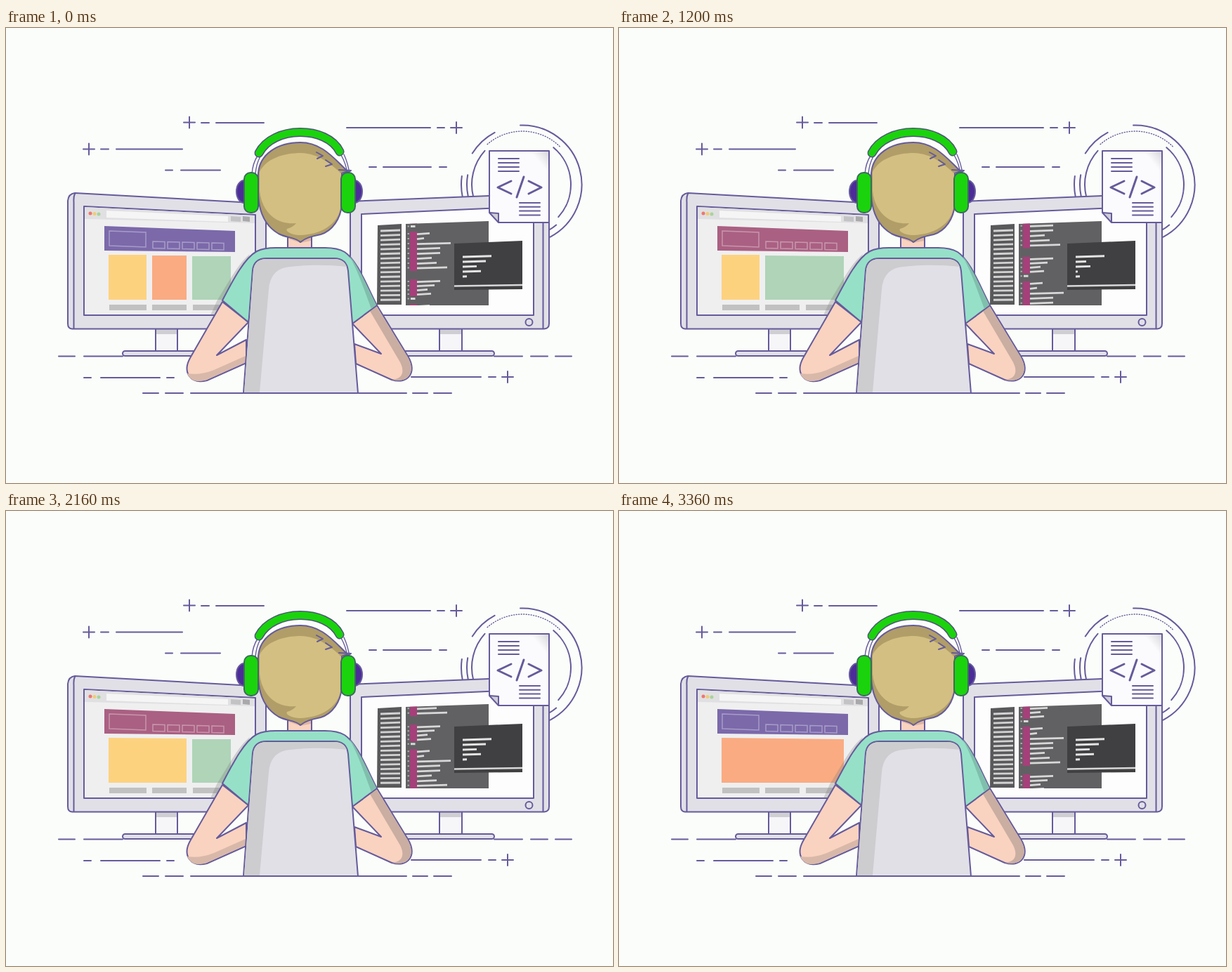
Recreate the animation shown at these times as an HTML page. Size 864 by 648 pixels, loop 3.52 s.

```html
<!DOCTYPE html>
<html lang="en">
<head>
<meta charset="utf-8">
<title>Developer at work</title>
<style>
  html, body { margin: 0; width: 100%; height: 100%; overflow: hidden; background: #fbfdfa; }
  svg { display: block; width: 100vw; height: 100vh; filter: blur(.65px); }
  .ink { stroke: #655b9b; stroke-width: 2; stroke-linejoin: round; stroke-linecap: round; }
  .body { fill: #e1e0e7; }
  .skin { fill: #fad2c0; }
  .none { fill: none; }
</style>
</head>
<body>
<svg viewBox="0 0 864 648">
  <defs>
    <clipPath id="panelClip"><path d="M569 279L687 275V395H569Z"/></clipPath>
    <linearGradient id="sheet" x1="0" y1="1" x2="1" y2="0">
      <stop offset=".84" stop-color="#fbfbfd"/><stop offset="1" stop-color="#d5d5da"/>
    </linearGradient>
  </defs>

  <path id="dashes" class="ink none"/>
  <path id="rings" class="ink none"/>
  <path id="dotted" class="ink none" stroke-dasharray="1 2.500" style="stroke-width: 1.4"/>

  <!-- left monitor -->
  <g class="ink body">
    <path d="M213 428H244V461H213Z" fill="#f6f6f9"/>
    <path d="M214 429H243V436H214Z" fill="#cfcfd3" stroke="none"/>
    <rect x="166" y="460" width="110" height="7" rx="3.500"/>
    <path d="M98 235L370 250V320L322 428.500H94Q88 428 88 421V246Q89 236 98 235Z"/>
    <path d="M98 236Q96 240 96.500 248V428" class="none"/>
    <path d="M111 254L355 266V330L318 409H111Z" fill="#efeff0"/>
  </g>
  <path d="M112 255L354 267V278L112 272Z" fill="#e0e0e2"/>
  <path d="M143 260L316 268V276L143 270Z" fill="#f5f5f5"/>
  <path d="M320 268L334 269V276L320 275Z" fill="#c3c3c6"/>
  <path d="M337 268L347 269V276L337 275Z" fill="#a9a9ab"/>
  <circle cx="120" cy="264" r="2.500" fill="#ee7670"/>
  <circle cx="126" cy="264.500" r="2.500" fill="#f1cc74"/>
  <circle cx="132" cy="265" r="2.500" fill="#a7d49c"/>
  <path id="header" d="M140 282L326 289V319L140 317Z"/>
  <path id="menu" fill="none" stroke="#fff" stroke-opacity=".34" stroke-width="1.500"/>
  <g id="cards"></g>
  <path d="M147 394H200V402H147ZM208 394H257V402H208ZM266 394H312V402H266Z" fill="#c1c1c2"/>
  <path d="M347 322C330 336 317 362 300 389L291 409H322Z" fill="#777" opacity=".28"/>

  <!-- right monitor -->
  <g class="ink body">
    <path d="M617 428H649V461H617Z" fill="#f6f6f9"/>
    <path d="M618 429H648V436H618Z" fill="#cfcfd3" stroke="none"/>
    <rect x="560" y="460" width="135" height="7" rx="3.500"/>
    <path d="M490 247L763 236Q773 237 773 248V421Q773 428 766 428.500H512L490 340Z"/>
    <path d="M763 237Q765 241 764.500 249V428" class="none"/>
    <path d="M506 265L751 254V409H520L506 360Z" fill="#fcfdfc"/>
    <circle cx="744.500" cy="419" r="5"/>
  </g>
  <path d="M529 281L563 279V394L528 394Z" fill="#59595b"/>
  <path id="files" stroke="#d2d2d2" stroke-width="2.800"/>
  <path d="M569 279L687 275V395H569Z" fill="#616163"/>
  <g clip-path="url(#panelClip)">
    <g id="code">
      <path id="marks" stroke="#a5407a" stroke-width="10"/>
      <path id="rows" stroke="#d8d8d8" stroke-width="2.800"/>
      <path id="dots" stroke="#a9a9ab" stroke-width="2"/>
    </g>
  </g>
  <path d="M638 307L735 303V372L638 373Z" fill="#404042"/>
  <path d="M638 367.500L735 366" stroke="#d8d8d8" stroke-width="2.500"/>
  <path id="shell" stroke="#e4e4e4" stroke-width="2.900"/>

  <!-- code sheet -->
  <g class="ink none">
    <path d="M688 175H773V277H702L688 262Z" fill="url(#sheet)"/>
    <path d="M688 263L701 264V277Z" fill="#cfced8"/>
    <path id="notes"/>
    <path d="M719 218L700 227L719 236M737 212L727 241M744 218L762 227L744 236" style="stroke-width: 3"/>
  </g>

  <!-- arms and shirt -->
  <g class="ink skin">
    <path d="M308 390L262 470C251 490 262 508 286 502L342 477V444L300 466L345 419Z"/>
    <path d="M528 395L573 469C585 490 573 508 549 501L498 478L496 450L534 464L493 421Z"/>
  </g>
  <path d="M258 492C263 504 274 505 286 501L341 476V467L296 487Q276 495 258 492Z" fill="#d8b8a9"/>
  <path d="M527 396L572 469C584 490 572 506 550 501C566 499 567 488 561 476L518 403Z" fill="#c9aea1"/>
  <path class="ink skin" d="M401 292H435V316H401Z"/>
  <path d="M402 296H434V303L419 306L402 300Z" fill="#dcb5a4"/>
  <path class="ink" fill="#96e0c8" d="M308 388C324 357 340 327 357 318Q367 313 384 313H454Q472 313 482 319C500 331 513 366 528 395L493 421L480 350H358L345 419Z"/>
  <path d="M489 325C501 337 515 370 527 394L520 400C510 374 502 348 489 325Z" fill="#80bfac"/>

  <!-- chair -->
  <path class="ink body" d="M338 520L351 345Q353 328 371 328H467Q485 328 487 346L501 520Z"/>
  <path d="M339 519L352 345Q354 329 371 329H467Q481 329 485 340C450 336 416 338 398 341Q376 346 374 372L361 519Z" fill="#cdcdcf"/>

  <!-- head -->
  <path class="ink" fill="#b09d68" d="M419 305C412 298 399 299 388 293C369 282 359 263 359 232V207C361 180 386 163 419 163C444 163 460 178 476 194L486 204L478 207V250C477 272 464 289 448 294C434 297 426 299 419 305Z"/>
  <path fill="#d3bf81" d="M361 205C370 186 395 178 420 178C445 179 462 193 477 207V250C475 282 445 294 420 295C408 295 397 290 400 286Q408 284 413 278C385 281 364 262 361 232Z"/>
  <path class="ink none" d="M442 177L451 182L443 186M455 188L464 194L455 197M474 202L491 203L480 209"/>

  <!-- headphones -->
  <g class="ink none">
    <path d="M358 182Q351 193 350 208M362 183Q356 194 355 208M477 181Q484 193 486 208M481 180Q487 193 489 208" style="stroke-width: 1.4"/>
    <ellipse cx="339" cy="233" rx="11" ry="16" fill="#4c2d98"/>
    <ellipse cx="496" cy="233" rx="11" ry="16" fill="#4c2d98"/>
    <path d="M360 178C380 139 457 139 475 176" style="stroke: #50547b; stroke-width: 13"/>
    <path d="M360 178C380 139 457 139 475 176" style="stroke: #1ad30c; stroke-width: 10"/>
    <rect x="339" y="206" width="20" height="57" rx="9" fill="#1ad30c" style="stroke: #3f6960"/>
    <rect x="477" y="206" width="20" height="57" rx="9" fill="#1ad30c" style="stroke: #3f6960"/>
  </g>
</svg>
<script>
const $ = id => document.getElementById(id);
const put = (id, d) => $(id).setAttribute('d', d);
const dash = (y, ...xs) => {
  let d = '';
  for (let i = 0; i < xs.length; i += 2) d += `M${xs[i]} ${y}H${xs[i + 1]}`;
  return d;
};
const plus = (x, y) => `M${x - 8} ${y}h16M${x} ${y - 8}v16`;
const arc = (r, from, to) => {
  const at = a => `${735 + r * Math.cos(a * Math.PI / 180)} ${223 + r * Math.sin(a * Math.PI / 180)}`;
  return `M${at(from)}A${r} ${r} 0 0 1 ${at(to)}`;
};

put('dashes', plus(118, 172.5) + dash(172.5, 135, 146, 157, 251) +
  plus(261, 134.5) + dash(135, 278, 289, 299, 367) +
  dash(202.5, 227, 237, 249, 305) +
  dash(142, 485, 604, 614, 624) + plus(641, 142) +
  dash(198, 517, 527, 537, 605, 617, 627) +
  dash(467.5, 75, 98, 111, 166, 695, 735, 747, 771, 782, 805) +
  dash(498, 111, 121, 135, 219, 229, 239) +
  dash(497, 577, 676, 687, 697) + plus(714, 497) +
  dash(520, 195, 217, 227, 252, 263, 570, 579, 600, 609, 634));
put('rings', arc(84.5, -92, 62) + arc(69, -50, 42) +
  arc(84, 212, 242) + arc(87, 168, 188) + arc(79, 168, 190) + arc(72, 165, 222) + arc(75, 50, 60));
put('dotted', arc(76, -131, -45));

let menu = 'M147 289L199 291V312L147 310Z';
for (let i = 0; i < 5; i++) menu += `M${209 + i * 21} ${304 + i * .5}l17 .5v9.500l-17 -.5Z`;
put('menu', menu);

let files = '';
for (let i = 0; i < 16; i++) files += `M533 ${289 + i * 6.55}L561 ${288 + i * 6.6}`;
put('files', files);

let notes = '';
for (let i = 0; i < 4; i++) notes += `M701 ${186 + i * 6}H730M731 ${249 + i * 5.8}H760`;
put('notes', notes);

// One code listing, repeated every LOOP pixels: [offset, right end]
const LOOP = 103;
const listing = [[0, 603], [7, 595], [14, 633], [21, 618], [28, 618], [35, 606], [42, 613],
  [48.5, 628], [68, 618], [74, 610], [80, 600], [86, 605]];
let rows = '', marks = '', dots = '';
for (let k = 0; k < 3; k++) {
  const top = k * LOOP;
  marks += `M580 ${top - 3}V${top + 53}M580 ${top + 65}V${top + 89}`;
  for (const [y, x] of listing) {
    rows += `M585 ${top + y + .6}L${x} ${top + y - .6}`;
    dots += `M571.500 ${top + y}h2.500`;
  }
  rows += `M576 ${top + 92.500}h6.500`;
  dots += `M571.500 ${top + 92.500}h2.500`;
}
put('rows', rows);
put('marks', marks);
put('dots', dots);

// Cards: [colour, first column, last column]
const YELLOW = '#fdd27f', ORANGE = '#faab82', GREEN = '#afd4b8';
const columns = [[146, 200], [208, 257], [265, 320]];
const layouts = [
  [[YELLOW, 0, 0], [ORANGE, 1, 1], [GREEN, 2, 2]],
  [[YELLOW, 0, 0], [GREEN, 1, 2]],
  [[YELLOW, 0, 1], [GREEN, 2, 2]],
  [[ORANGE, 0, 2]]
];
const full = [691, 683, 670, 676, 656];
const shells = [full, [691, 665, 671, 653, 656], full, [663, 683, 653, 676, 656], full];

function showStep(step) {
  const layout = Math.max(0, (step - 1) >> 1);
  $('header').setAttribute('fill', layout === 1 || layout === 2 ? '#aa6082' : '#7b69aa');
  $('cards').innerHTML = layouts[layout].map(([fill, a, b]) => {
    const x = columns[a][0], end = columns[b][1];
    return `<path fill="${fill}" d="M${x} ${323 + a}L${end} ${323 + b}V387H${x}Z"/>`;
  }).join('');
  $('code').setAttribute('transform', `translate(0 ${293 - LOOP - step * 10.75})`);
  put('shell', shells[step >> 1].map((x, i) =>
    `M650 ${326 + i * 7}L${x} ${326 + i * 7 - (x - 650) * .03}`).join(''));
}

let shown = -1;
function tick() {
  const step = Math.floor((performance.now() % 3520 + 80) / 400);
  if (step !== shown) showStep(shown = step);
  requestAnimationFrame(tick);
}
tick();
</script>
</body>
</html>
```
